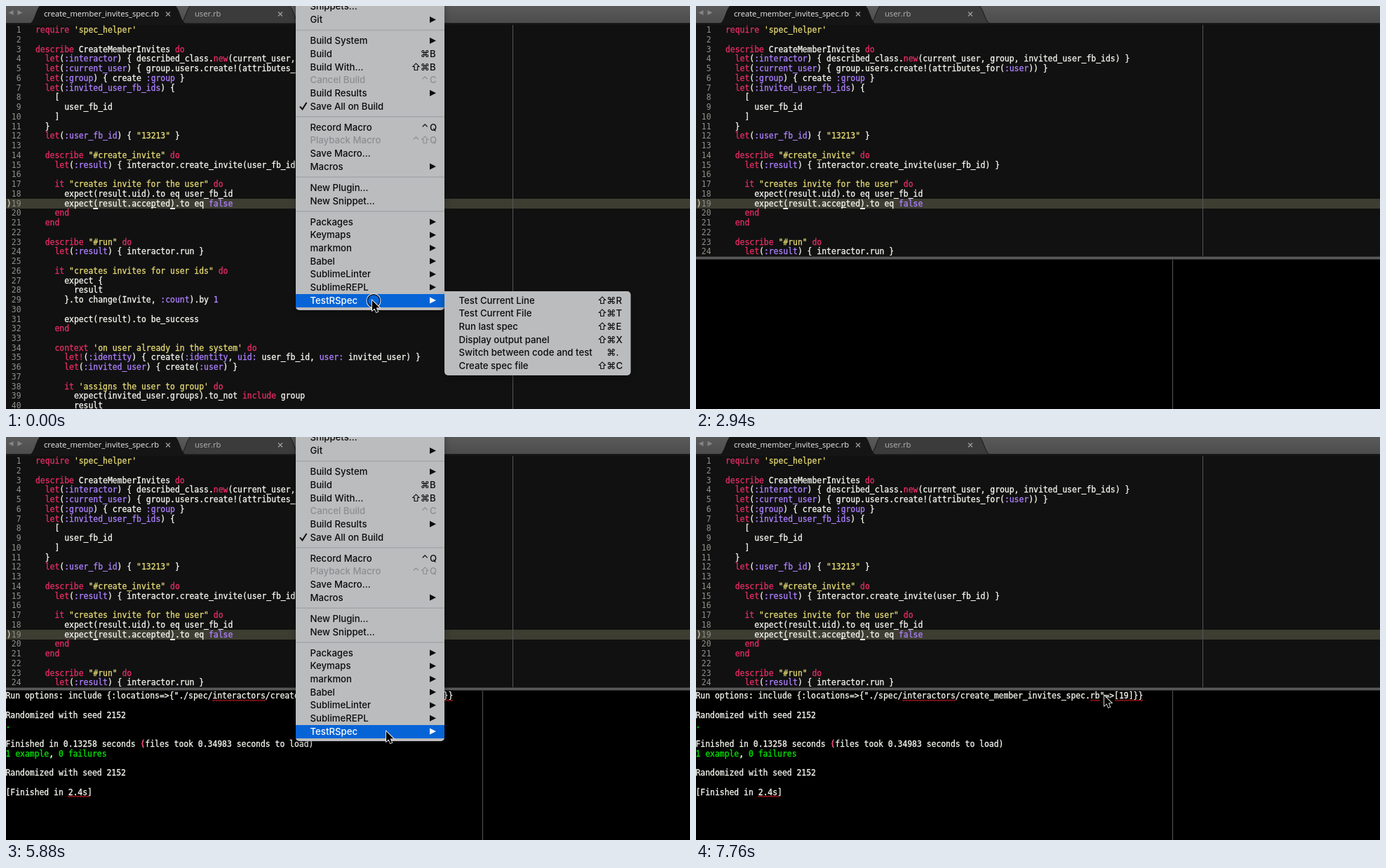
Animation of 975 by 575 pixels, one loop 8 s. Source, as an HTML page with a canvas:

```html
<!DOCTYPE html>
<html lang="en">
<head>
<meta charset="utf-8">
<title>Running specs from the editor menu</title>
<style>
html, body { margin: 0; width: 100%; height: 100%; overflow: hidden; background: #111; }
canvas { display: block; }
</style>
</head>
<body>
<canvas id="stage" width="975" height="575"></canvas>
<script>
const ctx = document.getElementById('stage').getContext('2d');
const LOOP = 8000, W = 975, H = 575;
const CODE_FONT = '11.4px "DejaVu Sans Mono", monospace';
const MENU_FONT = '500 13.2px Inter, "DejaVu Sans", sans-serif';
const TAB_FONT = '11.2px "Open Sans", sans-serif';
const CHAR = 6.86, LINE = 13.744, ROW = 18.65, GAP = 11.55;
const RED = '#e82c66', YELLOW = '#e6db74', PURPLE = '#ae81ff', WHITE = '#f8f8f2', GREEN = '#00e800';

const code = `require 'spec_helper'

describe CreateMemberInvites do
  let(:interactor) { described_class.new(current_user, group, invited_user_fb_ids) }
  let(:current_user) { group.users.create!(attributes_for(:user)) }
  let(:group) { create :group }
  let(:invited_user_fb_ids) {
    [
      user_fb_id
    ]
  }
  let(:user_fb_id) { "13213" }

  describe "#create_invite" do
    let(:result) { interactor.create_invite(user_fb_id) }

    it "creates invite for the user" do
      expect(result.uid).to eq user_fb_id
      expect(result.accepted).to eq false
    end
  end

  describe "#run" do
    let(:result) { interactor.run }

    it "creates invites for user ids" do
      expect {
        result
      }.to change(Invite, :count).by 1

      expect(result).to be_success
    end

    context 'on user already in the system' do
      let!(:identity) { create(:identity, uid: user_fb_id, user: invited_user) }
      let(:invited_user) { create(:user) }

      it 'assigns the user to group' do
        expect(invited_user.groups).to_not include group
        result`.split('\n');

const output = [
  ['Run options: include {:locations=>{"./spec/interactors/create_member_invites_spec.rb"=>[19]}}'],
  [], ['Randomized with seed 2152'], ['.', GREEN], [],
  ['Finished in 0.13258 seconds (files took 0.34983 seconds to load)'],
  ['1 example, 0 failures', GREEN],
  [], ['Randomized with seed 2152'], [], ['[Finished in 2.4s]']
];

// Items: "~" disabled, "✓" checked, "-" separator, text after "|" is the shortcut.
const tools = ['Snippets...', 'Git|▶', '-', 'Build System|▶', 'Build|⌘B', 'Build With...|⇧⌘B',
  '~Cancel Build|⌃C', 'Build Results|▶', '✓Save All on Build', '-', 'Record Macro|⌃Q',
  '~Playback Macro|⌃⇧Q', 'Save Macro...', 'Macros|▶', '-', 'New Plugin...', 'New Snippet...', '-',
  'Packages|▶', 'Keymaps|▶', 'markmon|▶', 'Babel|▶', 'SublimeLinter|▶', 'SublimeREPL|▶', 'TestRSpec|▶'];
const test = ['Test Current Line|⇧⌘R', 'Test Current File|⇧⌘T', 'Run last spec|⇧⌘E',
  'Display output panel|⇧⌘X', 'Switch between code and test|⌘.', 'Create spec file|⇧⌘C'];
const lintModes = ['Lint Mode|▶', 'Mark Style|▶', 'Choose Gutter Theme...', 'Toggle Linter...|⌃⌘T', '-'];
const lintErrors = ['Lint This View|⌃⌘L', 'Next Error|⌃⌘E', 'Previous Error|⌃⇧⌘E'];
const lint = [...lintModes, ...lintErrors, 'Show All Errors|⌃⌘A', 'Make Warnings Passive',
  'Show Errors on Save', '-', 'Open User Settings', 'Debug Mode', 'Clear Color Scheme Folder',
  'Clear Caches', ...lintModes, ...lintErrors];

// time, pointer, x, y, selected tool, submenu, selected submenu item, click ring
const steps = [
  [0, 'arrow', 522, 420, 'TestRSpec', 'test', '', [524, 420.5]],
  [270, 'arrow', 590, 424, 'TestRSpec', 'test'],
  [530, 'arrow', 652, 428, 'TestRSpec', 'test', 'Test Current Line'],
  [800, 'arrow', 663, 427, 'TestRSpec', 'test', 'Test Current Line'],
  [1060, 'arrow', 663, 426, 'TestRSpec', 'test', '', [665.5, 427.5]],
  [1330, 'arrow', 655, 423],
  [1600, 'arrow', 580, 380],
  [1860, 'arrow', 477, 320],
  [2130, 'beam', 482, 325],
  [2400, ''],
  [4810, 'arrow', 505, 172, 'Record Macro'],
  [5070, 'arrow', 540, 357, 'Babel'],
  [5340, 'arrow', 550, 390, 'SublimeLinter', 'lint'],
  [5610, 'arrow', 546, 400, 'SublimeREPL'],
  [5880, 'arrow', 542, 420, 'TestRSpec'],
  [6150, 'arrow', 600, 424, 'TestRSpec', 'test'],
  [6420, 'arrow', 652, 438, 'TestRSpec', 'test', 'Test Current File'],
  [6690, 'arrow', 660, 449, 'TestRSpec', 'test', 'Run last spec'],
  [6950, 'arrow', 668, 449, 'TestRSpec', 'test', 'Run last spec'],
  [7220, 'arrow', 672, 439, 'TestRSpec', 'test', 'Test Current File'],
  [7490, 'arrow', 672, 439, 'TestRSpec', 'test', 'Test Current File', [674.5, 440]],
  [7760, 'arrow', 582, 369]
];

const blinks = [530, 1060, 1600, 2130, 2670, 2940, 3470, 4010, 4540, 5070, 5610, 6150, 6690, 7220];

function rect(x, y, w, h, color) {
  ctx.fillStyle = color;
  ctx.fillRect(x, y, w, h);
}

function text(s, x, y, color, align = 'left') {
  ctx.textAlign = align;
  ctx.fillStyle = color;
  ctx.fillText(s, x, y);
}

function mono(s, x, y, color) {
  text(s, x, y, color);
  ctx.strokeStyle = color;
  ctx.lineWidth = 0.3;
  ctx.strokeText(s, x, y);
}

function path(points, x, y) {
  ctx.beginPath();
  points.forEach(([px, py]) => ctx.lineTo(x + px, y + py));
}

function stroke(color, width) {
  ctx.strokeStyle = color;
  ctx.lineWidth = width;
  ctx.stroke();
}

const tokens = new RegExp([
  /(?<string>"[^"]*"|'[^']*')/,
  /(?<constant>:\w+|\b\w+:(?=\s)|\bfalse\b|\b\d+\b)/,
  /(?<keyword>\b(?:require|describe|context|do|let|new|it|end|include)\b!?)/,
  /(?<plain>\w+|[^\w\s:"']+|\s+|.)/
].map(r => r.source).join('|'), 'g');

function drawCode(line, y) {
  for (const { 0: s, index, groups } of line.matchAll(tokens)) {
    const color = groups.string ? YELLOW : groups.constant ? PURPLE : groups.keyword ? RED : WHITE;
    if (s.trim()) mono(s, 42 + index * CHAR, y, color);
  }
}

function drawTab(left, right, fill) {
  ctx.beginPath();
  ctx.moveTo(left - 15, 26);
  ctx.bezierCurveTo(left - 6, 24, left - 5, -1, left + 4, -2);
  ctx.lineTo(right - 4, -2);
  ctx.bezierCurveTo(right + 5, -1, right + 6, 24, right + 15, 26);
  ctx.fillStyle = fill;
  ctx.fill();
  stroke('#111', 0.9);
}

function drawTabs() {
  const bar = ctx.createLinearGradient(0, 0, 0, 25);
  bar.addColorStop(0, '#5a5a5a');
  bar.addColorStop(1, '#4c4c4c');
  rect(0, 0, W, 24.5, bar);
  drawTab(262, 405, '#3b3b3b');
  drawTab(48, 242, '#151515');
  rect(0, 24.5, W, 2.5, '#151515');
  ctx.font = TAB_FONT;
  text('create_member_invites_spec.rb', 54, 15, '#f0f0f0');
  text('user.rb', 269, 15, '#b4b4b4');
  for (const x of [231, 391]) {
    ctx.beginPath();
    for (const d of [-3, 3]) {
      ctx.moveTo(x - d, 8.5);
      ctx.lineTo(x + d, 14.5);
    }
    stroke('#9a9a9a', 1.4);
  }
  ctx.fillStyle = '#858585';
  for (const [x, d] of [[7, -3.5], [20, 3.5]]) {
    path([[d, 0], [-d, -3.5], [-d, 3.5]], x, 9.5);
    ctx.fill();
  }
}

function drawEditor(t, rows) {
  rect(0, 0, W, H, '#111');
  rect(0, 275, W, 14, '#3e3d32');
  rect(722, 27, 1, H, '#555');
  ctx.font = CODE_FONT;
  code.slice(0, rows).forEach((line, i) => {
    const y = 38.2 + i * LINE;
    text(i + 1, 21.5, y, '#8f908a', 'right');
    drawCode(line, y);
  });
  mono('()', -6, 285.5, '#d0d0c8');
  for (const col of [12, 28]) rect(42 + col * CHAR, 288, CHAR, 2, WHITE);
  if (blinks.filter(b => b <= t).length % 2 === 0) rect(207, 287, 7, 1, WHITE);
}

function squiggle(x1, x2, y) {
  ctx.beginPath();
  for (let x = x1, up = 0; x <= x2; x += 2, up = 1 - up) ctx.lineTo(x, y + up * 1.6);
  stroke('#e02020', 1);
}

function drawPanel(hasOutput) {
  rect(0, 357, W, H, '#000');
  rect(0, 357.5, W, 4, '#585858');
  rect(679, 362, 1, H, '#555');
  if (!hasOutput) return;
  ctx.font = CODE_FONT;
  const lineY = i => 373.4 + i * LINE;
  output.forEach(([s, color = WHITE], i) => s && mono(s, -0.5, lineY(i), color));
  mono(',', 9 * CHAR - 0.5, lineY(6), WHITE);
  mono('(', 28 * CHAR - 0.5, lineY(5), RED);
  squiggle(294, 370, 375);
  squiggle(562, 576, 375);
  squiggle(597, 637, 375);
  squiggle(88, 121, 512);
}

function drawMenu(x, top, width, items, selected) {
  const height = 8 + items.reduce((sum, item) => sum + (item === '-' ? GAP : ROW), 0);
  const edge = Math.round(top);
  ctx.save();
  ctx.shadowColor = 'rgba(0,0,0,.3)';
  ctx.shadowBlur = 12;
  ctx.shadowOffsetY = 4;
  ctx.fillStyle = '#bbbcbe';
  ctx.beginPath();
  ctx.roundRect(x, edge, width, Math.ceil(top + height) - edge, [0, 5, 5, 5]);
  ctx.fill();
  ctx.restore();

  ctx.font = MENU_FONT;
  let y = top + 4;
  for (const item of items) {
    if (item === '-') {
      rect(x, y + GAP / 2 - 0.7, width, 1.4, '#a4a5a7');
      y += GAP;
      continue;
    }
    const [, mark, label, keys = ''] = item.match(/^([~✓]?)([^|]*)\|?(.*)$/);
    const on = label === selected;
    const color = on ? '#fff' : mark === '~' ? '#8c8e90' : '#0c0c0c';
    const mid = y + ROW / 2, base = mid + 4.7, keyX = x + width - 21;
    if (on) rect(x, Math.round(y + 0.4), width, 19, '#0764d6');
    if (mark === '✓') {
      path([[6, 0.5], [9.5, 4.5], [15.5, -5]], x, mid);
      stroke(color, 2);
    }
    text(label, x + 20.5, base, color);
    if (keys === '▶') {
      path([[0, -4.5], [9, 0], [0, 4.5]], keyX, mid);
      ctx.fill();
    } else if (keys) {
      text(keys.at(-1), keyX, base, color);
      [...keys.slice(0, -1)].reverse().forEach((k, i) => text(k, keyX - 6.8 - i * 12.7, base, color, 'center'));
    }
    y += ROW;
  }
}

function drawRing([x, y]) {
  for (const [radius, color] of [[9.8, '#eee'], [8.8, '#111']]) {
    ctx.beginPath();
    ctx.arc(x, y, radius, 0, 7);
    stroke(color, 1.3);
  }
}

function drawPointer(kind, x, y) {
  if (kind === 'arrow') {
    path([[0, 0], [0, 14.5], [3.4, 11.4], [5.8, 17], [8.2, 16], [5.8, 10.6], [10.4, 10.4]], x, y);
    ctx.closePath();
    stroke('#fff', 1.6);
    ctx.fillStyle = '#000';
    ctx.fill();
  } else if (kind === 'beam') {
    rect(x, y - 7, 1, 14, '#ddd');
    for (const end of [-8, 7]) {
      rect(x - 3, y + end, 3, 1, '#ddd');
      rect(x + 1, y + end, 3, 1, '#ddd');
    }
  }
}

function draw(t) {
  const [, kind, x, y, tool, sub, item, ring] = steps.findLast(s => s[0] <= t);
  const panelOpen = t >= 1600;
  drawEditor(t, panelOpen ? 24 : 40);
  drawTabs();
  if (panelOpen) drawPanel(t >= 3740);
  if (t < 1330 || (t >= 4540 && t < 7760)) drawMenu(413, -12.6, 212, tools, tool);
  if (sub === 'test') drawMenu(625, 406.7, 265.5, test, item);
  if (sub === 'lint') drawMenu(625, 148.7, 224, lint);
  if (ring) drawRing(ring);
  drawPointer(kind, x, y);
}

function tick() {
  draw(performance.now() % LOOP);
  requestAnimationFrame(tick);
}
tick();
</script>
</body>
</html>
```
